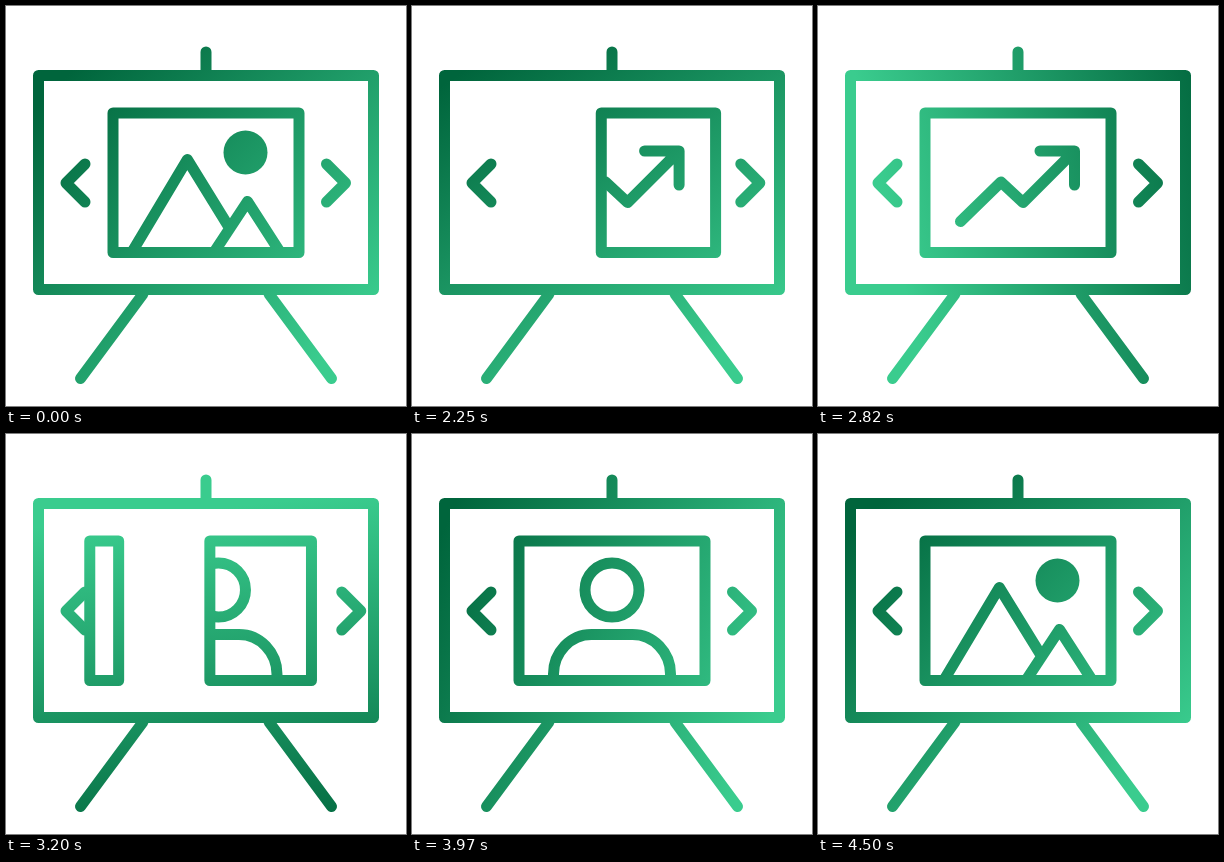
Write an HTML page with a canvas that moves like this. It is 400x400 px and loops after 4.52 s.

```html
<!DOCTYPE html>
<html lang="en">
<head>
<meta charset="utf-8">
<title>Presentation board</title>
<style>
  html, body { margin: 0; width: 100%; height: 100%; overflow: hidden; background: #fff; }
  canvas { display: block; width: 400px; height: 400px; }
</style>
</head>
<body>
<canvas id="stage" width="400" height="400"></canvas>
<script>
const ctx = document.getElementById('stage').getContext('2d');

const LOOP = 4520, FIRST = 2000, STEP = 1000, SLIDE = 500, SPIN = 2500;
const LEFT = 107, RIGHT = 293, TOP = 107, BOTTOM = 246.5;
const SHIFT = 27.5, SPAN = RIGHT - LEFT + SHIFT;
const DARK = '#00653c', LIGHT = '#3acc8e';

const board = new Path2D(
  'M32.5 69.5H367.5V283.5H32.5Z M200 46V66 M137 288L74.5 372.5 M263 288L325.5 372.5' +
  'M79 158L60 177L79 196');
const nextArrow = new Path2D('M320.5 158L339.5 177L320.5 196');

const sun = new Path2D();
sun.arc(239.5, 146.5, 22, 0, Math.PI * 2);

const slides = [
  { line: new Path2D('M126 246L181.3 153.5L223.5 222 M209.5 244L241.5 195.5L274 246'), fill: sun },
  { line: new Path2D('M142.5 215.5L183 176L205 196.5L256.5 145 M222 145H256.5V179') },
  { line: new Path2D('M173 156a27 27 0 1 0 54 0a27 27 0 1 0 -54 0Z' +
      'M141.5 246V240A38 39.5 0 0 1 179.5 200.5H220.5A38 39.5 0 0 1 258.5 240V246') }
];

function bezier(x1, y1, x2, y2) {
  const at = (a, b, s) => 3 * (1 - s) * (1 - s) * s * a + 3 * (1 - s) * s * s * b + s * s * s;
  return x => {
    if (x <= 0) return 0;
    if (x >= 1) return 1;
    let lo = 0, hi = 1;
    for (let i = 0; i < 24; i++) {
      const mid = (lo + hi) / 2;
      if (at(x1, x2, mid) < x) lo = mid; else hi = mid;
    }
    return at(y1, y2, lo);
  };
}

// Linear interpolation through [time, value] pairs
function track(keys, t) {
  if (t <= keys[0][0]) return keys[0][1];
  for (let i = 1; i < keys.length; i++) {
    const [t0, v0] = keys[i - 1], [t1, v1] = keys[i];
    if (t < t1) return v0 + (v1 - v0) * (t - t0) / (t1 - t0);
  }
  return keys[keys.length - 1][1];
}

const spinEase = bezier(.33, 0, .45, 1);
const leaveEase = bezier(.36, 0, .7, .9);
const enterKeys = [[80, 0], [200, .545], [250, .613], [400, .87], [500, 1]];

function paint(t) {
  const p = spinEase((t - FIRST) / SPIN);
  const angle = Math.PI / 4 + p * Math.PI * 2;
  const bias = 55 * Math.sin(Math.PI * p);
  const half = 190 - 15 * Math.sin(Math.PI * p);
  const point = d => [200 + d * Math.cos(angle), 200 + d * Math.sin(angle)];
  const g = ctx.createLinearGradient(...point(-bias - half), ...point(-bias + half));
  g.addColorStop(0, DARK);
  g.addColorStop(1, LIGHT);
  return g;
}

// Moves the geometry only, so the gradient stays put
function moved(path, dx) {
  const out = new Path2D();
  out.addPath(path, new DOMMatrix([1, 0, 0, 1, dx, 0]));
  return out;
}

function panel(slide, left, right, dx) {
  ctx.save();
  ctx.beginPath();
  ctx.rect(left, TOP, right - left, BOTTOM - TOP);
  ctx.clip();
  ctx.stroke(moved(slide.line, dx));
  if (slide.fill) ctx.fill(moved(slide.fill, dx));
  ctx.restore();
  ctx.strokeRect(left, TOP, right - left, BOTTOM - TOP);
}

function draw(t) {
  ctx.fillStyle = '#fff';
  ctx.fillRect(0, 0, 400, 400);
  ctx.strokeStyle = ctx.fillStyle = paint(t);
  ctx.lineWidth = 11;
  ctx.lineCap = ctx.lineJoin = 'round';

  const turn = Math.min(2, Math.floor((t - FIRST) / STEP));
  const age = t - FIRST - turn * STEP;
  const idle = turn < 0;
  const nudge = !idle && age < 333 ? 17 * Math.sin(Math.PI * age / 333) ** 2 : 0;

  ctx.stroke(board);
  ctx.stroke(moved(nextArrow, nudge));

  if (idle || age >= SLIDE) {
    panel(slides[idle ? 0 : (turn + 1) % 3], LEFT, RIGHT, 0);
    return;
  }
  if (age < 250) {
    const out = leaveEase(age / 250);
    panel(slides[turn], LEFT - SHIFT * out, RIGHT - SPAN * out, -SHIFT * out);
  }
  if (age > 80) {
    const rest = 1 - track(enterKeys, age);
    panel(slides[(turn + 1) % 3], LEFT + SPAN * rest, RIGHT + SHIFT * rest, SHIFT * rest);
  }
}

const start = performance.now();
function tick() {
  draw((performance.now() - start) % LOOP);
  requestAnimationFrame(tick);
}
tick();
</script>
</body>
</html>
```
